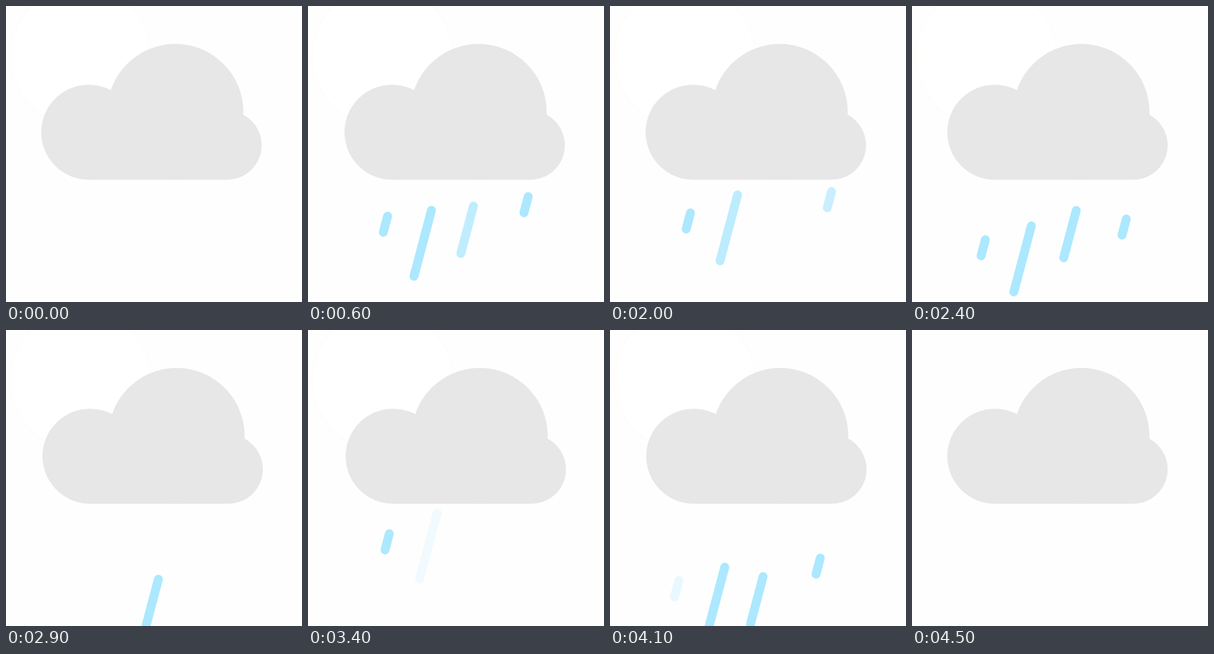
Animation of 500x500 px, one loop 4600 ms. Source, as an HTML page:

```html
<!DOCTYPE html>
<html lang="en">
<head>
<meta charset="utf-8">
<title>Rain cloud</title>
<style>
  html, body { margin: 0; width: 100%; height: 100%; overflow: hidden; background: #fefefe; }
  svg { display: block; width: 100vw; height: 100vh; }
</style>
</head>
<body>
<svg viewBox="0 0 500 500">
  <clipPath id="base"><rect width="500" height="293.4"/></clipPath>
  <circle id="sun" cx="126" cy="85" r="119" fill="#fff" stroke="#fffcf3" stroke-width="1.5"/>
  <g id="rain" stroke="#ace8ff" stroke-width="15" stroke-linecap="round"></g>
  <g id="cloud" fill="#e7e7e7" clip-path="url(#base)">
    <circle cx="139.8" cy="213.2" r="80.3"/>
    <circle cx="286" cy="179" r="115"/>
    <circle cx="373.5" cy="235.2" r="58.3"/>
    <rect x="139.8" y="213" width="233.7" height="81"/>
  </g>
</svg>
<script>
const LOOP = 4600, STEP = 100, SWAY = 2300;
const LIFE = 900, FADE = 120, SLANT = -0.265;

// x, y: upper end at birth; len: vertical extent; speed in px per ms
const drops = [
  { x: 142.4, y: 325, len: 27.3, speed: 0.113, starts: [335, 1783, 3231] },
  { x: 218.8, y: 306.4, len: 111.5, speed: 0.131, starts: [305, 1904, 3382] },
  { x: 283, y: 324.4, len: 80, speed: 0.1514, starts: [510, 2262, 3491] },
  { x: 376.6, y: 304.6, len: 27.3, speed: 0.1157, starts: [450, 1923, 3403] }
];

const byId = id => document.getElementById(id);
const sun = byId("sun"), rain = byId("rain"), cloud = byId("cloud");

for (const d of drops) {
  d.line = document.createElementNS("http://www.w3.org/2000/svg", "line");
  d.line.setAttribute("x1", d.x);
  d.line.setAttribute("y1", d.y);
  d.line.setAttribute("x2", d.x + SLANT * d.len);
  d.line.setAttribute("y2", d.y + d.len);
  rain.append(d.line);
}

function drawDrop(d, t) {
  const start = d.starts.find(s => t >= s && t < s + LIFE);
  if (start === undefined) {
    d.line.setAttribute("opacity", 0);
    return;
  }
  const age = t - start;
  const fall = age * d.speed;
  d.line.setAttribute("opacity", Math.min(1, age / FADE, (LIFE - age) / FADE));
  d.line.setAttribute("transform", `translate(${SLANT * fall} ${fall})`);
}

function draw(t) {
  const shift = 2 * (1 - Math.cos(2 * Math.PI * t / SWAY));
  cloud.setAttribute("transform", `translate(${shift} 0)`);
  sun.setAttribute("opacity", t < 4500 ? 1 : 0);
  drops.forEach(d => drawDrop(d, t));
}

const origin = performance.now();
function tick() {
  const t = (performance.now() - origin) % LOOP;
  draw(Math.floor(t / STEP) * STEP);
  requestAnimationFrame(tick);
}
draw(0);
requestAnimationFrame(tick);
</script>
</body>
</html>
```
